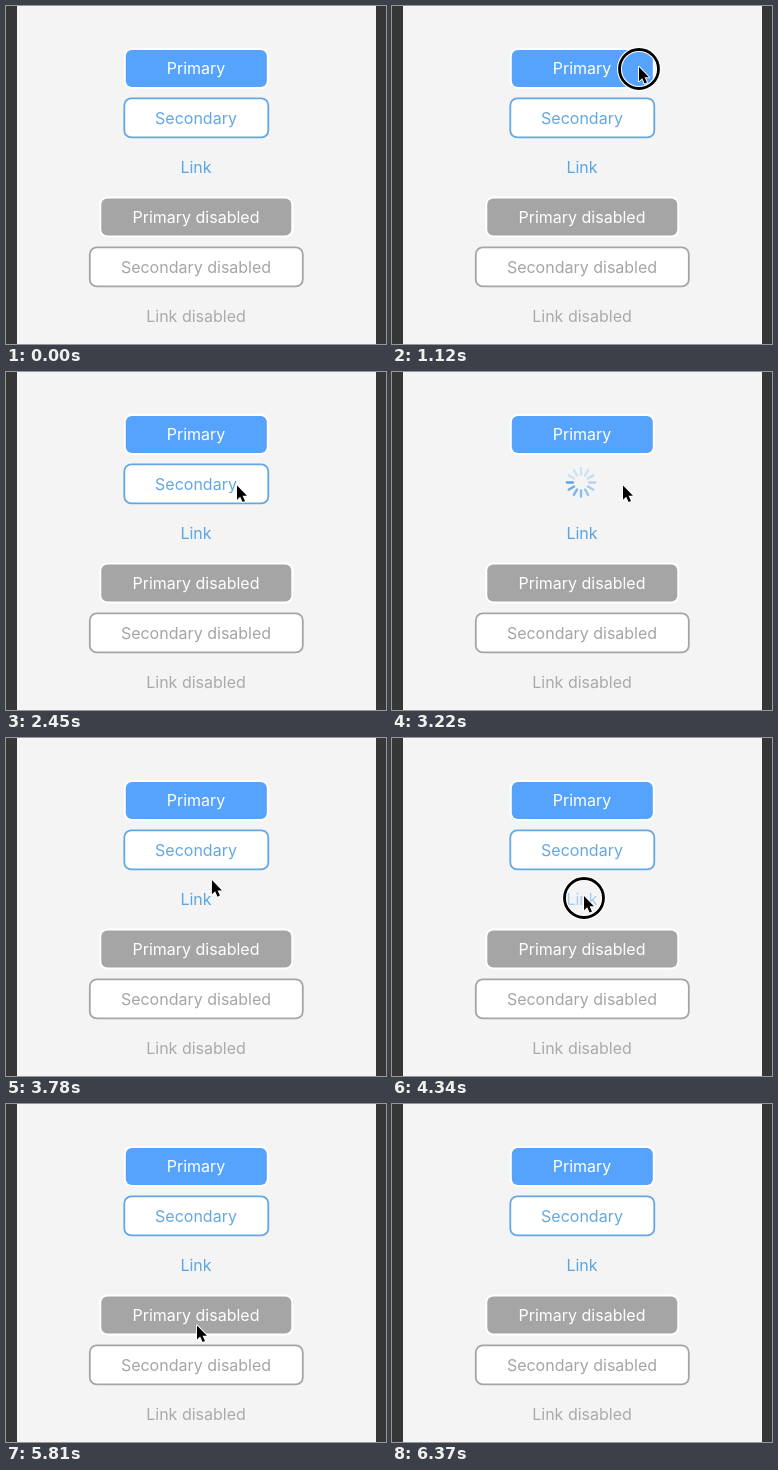
Write an HTML page with a canvas that moves like this. It is 380 by 338 pixels and loops after 6.58 s.

```html
<!DOCTYPE html>
<html lang="en">
<head>
<meta charset="utf-8">
<title>Button states</title>
<style>
  html, body { margin: 0; width: 100%; height: 100%; overflow: hidden; background: #f4f4f4; }
  canvas { display: block; width: 380px; height: 338px; }
</style>
</head>
<body>
<canvas id="stage"></canvas>
<script>
const WIDTH = 380, HEIGHT = 338, CENTER = 190.3;
const LOOP = 6580, TICK = 70, LOADING = 560;
const BLUE = '#55a3fc', LINE_BLUE = '#63a8e4', GREY = '#a5a5a5';

const canvas = document.getElementById('stage');
const ctx = canvas.getContext('2d');
const ratio = window.devicePixelRatio || 1;
canvas.width = WIDTH * ratio;
canvas.height = HEIGHT * ratio;

// press and release are the times of the click on the button.
const buttons = [
  { label: 'Primary', kind: 'solid', y: 62.4, width: 141, color: BLUE, press: 1120, release: 1750 },
  { label: 'Secondary', kind: 'outline', y: 111.9, width: 144, color: LINE_BLUE, press: 2660, release: 3150 },
  { label: 'Link', kind: 'link', y: 161.5, color: '#5ba5e2', press: 4270, release: 4830 },
  { label: 'Primary disabled', kind: 'solid', y: 211.1, width: 190, color: GREY },
  { label: 'Secondary disabled', kind: 'outline', y: 260.9, width: 213, color: GREY },
  { label: 'Link disabled', kind: 'link', y: 310.4, color: '#aaaaaa' }
];

// Pointer path: time, x, y. Each leg decelerates towards its end.
const path = [
  [70, 84, 288], [490, 265, 47], [700, 247, 61],
  [1820, 247, 61], [2450, 231, 113.5],
  [3500, 231, 113.5], [4130, 192, 158],
  [5180, 192, 158], [5320, 190, 192], [5880, 191, 222],
  [6020, 194, 261], [6160, 194, 261], [6300, 197, 304]
];
const POINTER_END = 6370;

const easeOut = p => Math.sin(p * Math.PI / 2);

function pointerAt(time) {
  if (time < path[0][0] || time >= POINTER_END) return null;
  const next = path.findIndex(([at]) => at > time);
  if (next < 0) return path[path.length - 1].slice(1);
  const [t0, x0, y0] = path[next - 1];
  const [t1, x1, y1] = path[next];
  const p = easeOut((time - t0) / (t1 - t0));
  return [x0 + (x1 - x0) * p, y0 + (y1 - y0) * p];
}

function box(y, width, height, radius) {
  ctx.beginPath();
  ctx.roundRect(CENTER - width / 2, y - height / 2, width, height, radius);
}

function drawButton({ label, kind, y, width, color }) {
  if (kind === 'solid') {
    box(y, width + 4, 41, 8);
    ctx.fillStyle = '#fff';
    ctx.fill();
    box(y, width, 37, 6);
    ctx.fillStyle = color;
    ctx.fill();
  } else if (kind === 'outline') {
    box(y, width, 39, 7);
    ctx.fillStyle = '#fff';
    ctx.fill();
    ctx.strokeStyle = color;
    ctx.lineWidth = 1.8;
    ctx.stroke();
  }
  ctx.fillStyle = kind === 'solid' ? '#fff' : color;
  ctx.fillText(label, CENTER - 0.3, y + 5.7);
}

function drawSpinner(y, elapsed) {
  const lead = Math.floor(9 + elapsed * 12 / 1000);
  ctx.save();
  ctx.translate(189, y);
  ctx.strokeStyle = '#58a6e8';
  ctx.lineWidth = 2.3;
  ctx.lineCap = 'round';
  for (let spoke = 0; spoke < 12; spoke++) {
    const age = (lead - spoke + 12) % 12;
    ctx.globalAlpha = Math.max(0.25, 1 - age * 0.1);
    ctx.beginPath();
    ctx.moveTo(0, -8);
    ctx.lineTo(0, -14.3);
    ctx.stroke();
    ctx.rotate(Math.PI / 6);
  }
  ctx.restore();
}

function drawRing(x, y) {
  ctx.beginPath();
  ctx.arc(x, y, 19.5, 0, Math.PI * 2);
  for (const [color, width] of [['#fff', 5], ['#000', 2.8]]) {
    ctx.strokeStyle = color;
    ctx.lineWidth = width;
    ctx.stroke();
  }
}

const arrow = new Path2D('M0 0V14.2L3.2 11.2L5.6 16.6L8 15.5L5.6 10.3H10Z');

function drawPointer(x, y) {
  ctx.save();
  ctx.translate(x, y);
  ctx.strokeStyle = '#fff';
  ctx.lineWidth = 1.8;
  ctx.lineJoin = 'round';
  ctx.stroke(arrow);
  ctx.fillStyle = '#000';
  ctx.fill(arrow);
  ctx.restore();
}

function draw(time) {
  ctx.setTransform(ratio, 0, 0, ratio, 0, 0);
  ctx.fillStyle = '#363636';
  ctx.fillRect(0, 0, WIDTH, HEIGHT);
  ctx.fillStyle = '#f4f4f4';
  ctx.fillRect(11, 0, 359, HEIGHT);
  ctx.font = '400 16px Inter, sans-serif';
  ctx.textAlign = 'center';

  let pressed = false;
  for (const button of buttons) {
    const { y, press, release } = button;
    if (time >= release && time < release + LOADING) {
      drawSpinner(y - 1.4, time - release);
      continue;
    }
    const held = time >= press && time < release;
    pressed ||= held;
    // The touch feedback follows one tick after the click.
    ctx.globalAlpha = held && time >= press + TICK ? 0.5 : 1;
    drawButton(button);
    ctx.globalAlpha = 1;
  }

  const pointer = pointerAt(time);
  if (!pointer) return;
  const [x, y] = pointer;
  if (pressed) drawRing(x, y + 2);
  drawPointer(x, y);
}

function frame() {
  const time = performance.now() % LOOP;
  draw(Math.floor(time / TICK) * TICK);
  requestAnimationFrame(frame);
}
frame();
</script>
</body>
</html>
```
